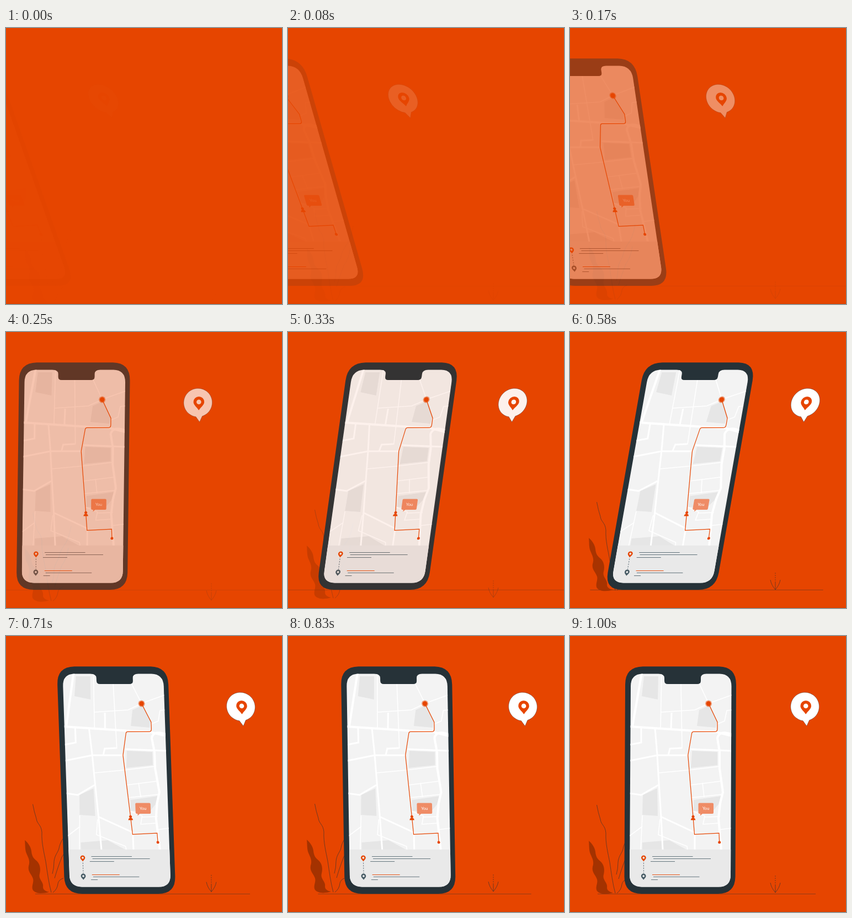
Write an HTML page that moves like this. It is 500 px wide and 500 px high and loops after 1.04 s.

```html
<!DOCTYPE html>
<html lang="en">
<head>
<meta charset="utf-8">
<title>Route on a phone</title>
<style>
html, body { margin: 0; width: 100%; height: 100%; overflow: hidden; background: #e64500; }
svg { display: block; width: 100%; height: 100%; }
.road { fill: none; stroke: #fff; }
.ink { fill: none; stroke: #263238; stroke-width: .6; }
.note { fill: none; stroke: #455a64; stroke-width: .8; }
.accent { fill: #e64500; }
</style>
</head>
<body>
<svg viewBox="0 0 500 500">
  <defs>
    <path id="marker" fill-rule="evenodd" d="M0 15C-3 10-9.8 5.500-9.8 0A9.800 9.800 0 0 1 9.800 0C9.800 5.500 3 10 0 15ZM0-4.300A4.300 4.300 0 0 0 0 4.300A4.300 4.300 0 0 0 0-4.300Z"/>
    <clipPath id="glass">
      <path d="M131 68.500H160Q171 68.500 171 76V81Q171 87 177 87H231Q237 87 237 81V76Q237 68.500 247 68.500H271Q292.500 69 292.500 91L291 433Q291 454.500 269 454.500H130Q108 454 108 433L110 91Q110 69 131 68.500Z"/>
    </clipPath>
  </defs>
  <rect width="500" height="500" fill="#e64500"/>

  <path id="floor" class="ink" d="M50 467.300H445"/>

  <g id="plants">
    <path fill="#a43200" d="M34 371C40 376 45 383 46 391C47 401 50 404 56 409C62 415 63 424 61 432C58 442 69 447 67 456C67 461 72 464 78 465C68 468 55 469 49 462C45 455 51 448 49 441C46 432 39 428 41 418C44 409 41 404 37 395C34 388 35 378 34 371Z"/>
    <g class="ink">
      <path d="M48.500 306Q51 320 55 332C56 342 64 343 65 357C64 375 69 394 72 410C75 430 77 447 82 466"/>
      <path d="M118 330Q114 355 104 367Q97 378 96 386C94 394 88 398 87 410Q87 422 84 432"/>
      <path d="M113 370Q110 390 101 402C98 410 95 418 92 427L88 440"/>
      <path d="M104 440Q95 443 94 450Q93 460 85 466"/>
      <path d="M363 447Q365 457 372 464.500Q379 457 381 447M372 450V465"/>
      <path d="M372 434V449" stroke-dasharray="2 2"/>
    </g>
  </g>

  <g id="phone">
    <path fill="#263238" d="M132 55.300H270Q301 56 301 88L299.500 436Q299 467 268 467H130Q98.500 467 98.500 436L100 88Q100 56 132 55.300Z"/>
    <g clip-path="url(#glass)">
      <path fill="#f3f3f3" d="M100 60H300V460H100Z"/>
      <g fill="#e6e6e6">
        <path d="M134 73L160 73L159 115L130 109Z"/>
        <path d="M234 134L254 125L266 155L264 166L230 163Z"/>
        <path d="M221 208L267 210L267 234L219 239Z"/>
        <path d="M132 288L158 276L159 326L131 324Z"/>
        <path d="M224 297L273 290L269 305L258 318L224 317Z"/>
        <path d="M131 374L180 370L211 387H131Z"/>
      </g>
      <g class="road" stroke-width="4">
        <path d="M130 67L113 164M108 164L214 171L265 174L293 181"/>
        <path d="M293 178Q270 170 267 185L271 210L271 240L277 283L272 303L269 330L274 388"/>
      </g>
      <g class="road" stroke-width="3">
        <path d="M154 167L158 215L160 250L165 328L168 388"/>
        <path d="M108 226L158 216H214M108 285L129 288L160 270M164 327L226 356V388"/>
        <path d="M108 197L129 193V167M178 216L181 204L202 203M184 139L183 168M218 205L293 208"/>
      </g>
      <g class="road" stroke-width="1.600">
        <path d="M166 67L164 168M201 86L203 204M164 138L226 134L254 121L293 107M234 86L251 122M266 160L280 154L284 135L293 134"/>
        <path d="M160 248L214 243L272 236M218 270L273 263M219 293L275 287M240 266L243 292"/>
        <path d="M163 332L160 360L212 381L213 388M131 325L128 388M108 362L131 345M222 317L244 326L241 341L270 339M244 328L272 327M269 351L293 348"/>
      </g>
      <path fill="#e9e9e9" d="M100 386.800H300V460H100Z"/>
    </g>

    <path fill="none" stroke="#e64500" stroke-width="1.200" d="M251 122.500L267 156V168Q267 173.300 263 173.300H224Q221 173.300 220.500 177L213.700 216L223 328L225.500 359.300L270 357.200L270.700 373.500"/>
    <g class="accent">
      <circle cx="251" cy="122.500" r="6" opacity=".5"/>
      <circle cx="251" cy="122.500" r="4.200"/>
      <circle cx="270.700" cy="373.700" r="2.500"/>
      <circle cx="223" cy="327.300" r="2.500"/>
      <path d="M218.800 333.500Q219 329.500 223 329.500T227.200 333.500Z"/>
    </g>
    <path fill="#ef8c66" d="M234.500 302.500H258Q260 302.500 260 304.500V320Q260 322 258 322H240L236 325.500V322H234.500Q232.500 322 232.500 320V304.500Q232.500 302.500 234.500 302.500Z"/>
    <text x="246.200" y="315.200" text-anchor="middle" font-family="Lato, sans-serif" font-size="7.600" fill="#fff">You</text>

    <use href="#marker" class="accent" transform="translate(133.400 401.800) scale(.45)"/>
    <use href="#marker" fill="#455a64" transform="translate(133.200 434.900) scale(.45)"/>
    <path class="note" stroke-dasharray="2.500 2" d="M133.400 410.500V430"/>
    <path class="note" d="M149 399.500H222.500M151 403.500H255M146 408.500H190M151 436.300H234.500M147 441.500H159"/>
    <path fill="none" stroke="#e64500" stroke-width=".9" d="M149 432.500H199"/>
  </g>

  <g id="pin">
    <path fill="#fff" stroke="#263238" stroke-width=".4" d="M422 153.500A25.800 25.800 0 1 1 433.500 152.500L428.800 163Z"/>
    <use href="#marker" class="accent" transform="translate(427.200 126.800)"/>
  </g>
  <rect y="498" width="500" height="2" fill="#dc4200"/>
</svg>
<script>
const LOOP = 1040, FRAME = 1000 / 24, LEAD = 33;
const part = id => document.getElementById(id);
const [floor, plants, phone, pin] = ["floor", "plants", "phone", "pin"].map(part);
const mix = (a, b, p) => a + (b - a) * p;
const clamp = v => Math.min(1, Math.max(0, v));
const slope = deg => Math.tan(deg * Math.PI / 180);

// cubic-bezier(.36, -.01, .5, 1.38)
function ease(p) {
  if (p <= 0 || p >= 1) return clamp(p);
  const curve = (a, b, s) => 3 * (1 - s) * s * ((1 - s) * a + s * b) + s ** 3;
  let low = 0, high = 1;
  for (let i = 0; i < 24; i++) {
    const mid = (low + high) / 2;
    if (curve(.36, .5, mid) < p) low = mid; else high = mid;
  }
  return curve(-.01, 1.38, low);
}

// Rush in from the left, leaning, then sway upright.
function rush(p) {
  if (p < .6) {
    const e = ease(p / .6);
    return { x: mix(-250, 0, e), lean: mix(slope(20), slope(-10), e), alpha: clamp(e) };
  }
  const lean = p < .8
    ? mix(slope(-10), slope(2), ease((p - .6) / .2))
    : mix(slope(2), 0, ease((p - .8) / .2));
  return { x: 0, lean, alpha: 1 };
}

function place(node, { x, lean, alpha }, centerY) {
  node.setAttribute("transform", `matrix(1 0 ${lean} 1 ${x - lean * centerY} 0)`);
  node.setAttribute("opacity", alpha);
}

function draw(ms) {
  const step = Math.floor((ms % LOOP + 5) / FRAME);
  const p = clamp(((step < 2 ? 0 : step * FRAME) + LEAD) / 1000);
  const pose = rush(p), e = ease(p);
  place(phone, pose, 261);
  place(pin, pose, 132.5);

  plants.setAttribute("transform", `translate(0 ${30 * (1 - e)})`);
  plants.setAttribute("opacity", clamp(e));

  const stretch = 1 + (1 - e) * (e < 1 ? 1 : .35);
  floor.setAttribute("transform", `translate(247.5 0) scale(${stretch} 1) translate(-247.5 0)`);
  floor.setAttribute("opacity", clamp(e) * .75);
}

const start = performance.now();
function tick() {
  draw(performance.now() - start);
  requestAnimationFrame(tick);
}
tick();
</script>
</body>
</html>
```
